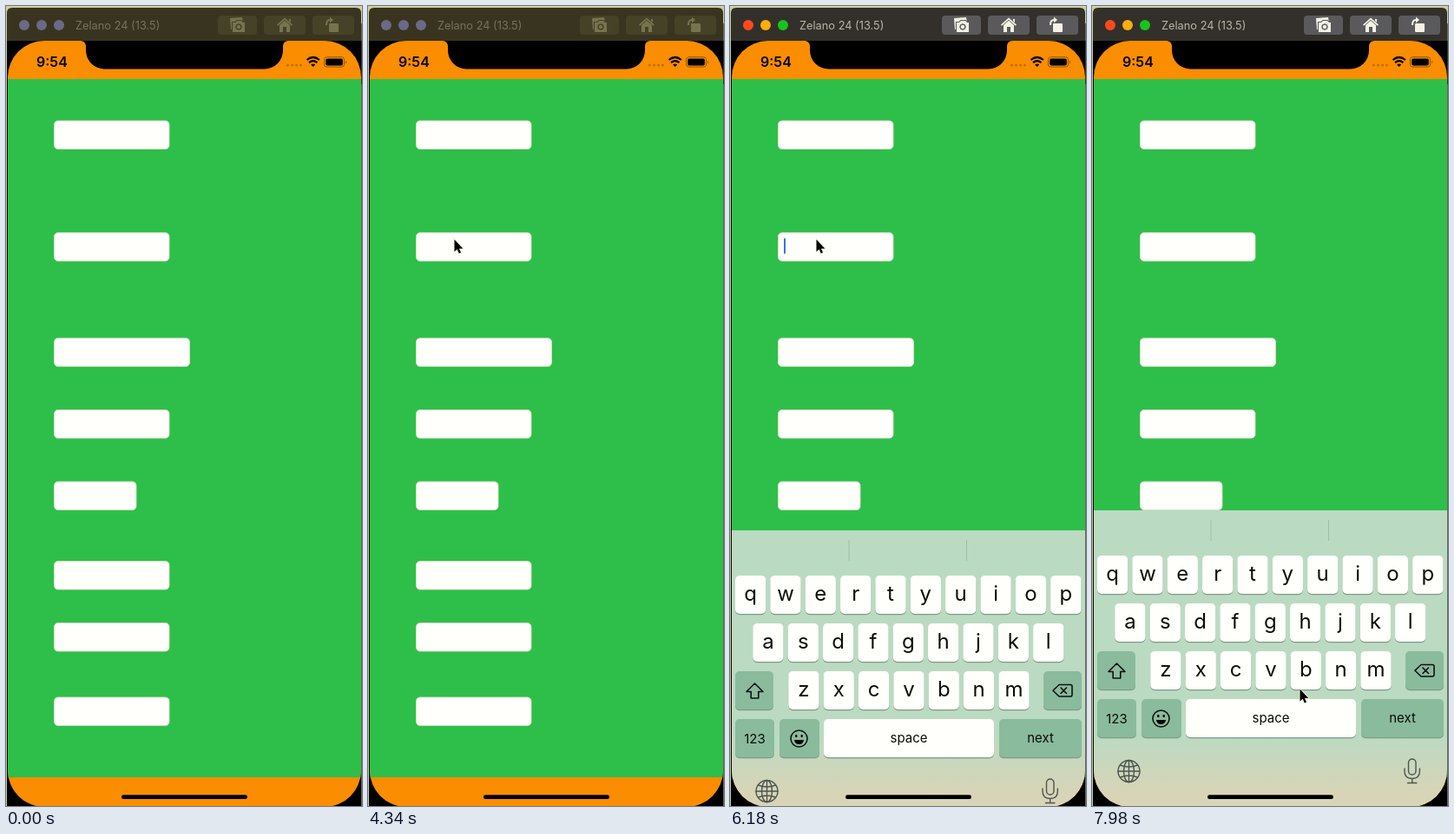
An HTML page for the animation above (8 s loop, 410x920 px).

```html
<!DOCTYPE html>
<html lang="en">
<head>
<meta charset="utf-8">
<title>Keyboard demo</title>
<style>
html, body { margin: 0; width: 100%; height: 100%; overflow: hidden; background: #cdd19c; }
svg { display: block; width: 410px; height: 920px; font-family: Inter, Roboto, sans-serif; }
.bar { fill: #38341f; } .btn { fill: #464227; } .icon { fill: #77734f; } .hole { fill: #464227; stroke: #464227; }
.title { fill: #77735a; font-size: 12.8px; } .light { fill: #6c6986; }
.active .bar { fill: #33302b; } .active .btn { fill: #5a5a5d; } .active .icon { fill: #f4f2e4; }
.active .hole { fill: #5a5a5d; stroke: #5a5a5d; }
.active .title { fill: #b9b5a8; }
.active .l0 { fill: #ff4a1c; } .active .l1 { fill: #fcae0c; } .active .l2 { fill: #18c41c; }
.letter { font-size: 24px; } .word { font-size: 15px; }
.letter, .word { text-anchor: middle; fill: #0c0c08; }
.line { fill: none; stroke: #111; stroke-width: 1.6; stroke-linejoin: round; stroke-linecap: round; }
.soft { stroke: #4c5550; stroke-width: 1.4; }
</style>
</head>
<body>
<svg id="stage" viewBox="0 0 410 920"></svg>
<script>
const LOOP = 8000, KEYS_TOP = 580;
const stage = document.getElementById('stage');

const rect = (x, y, w, h, r, attrs) =>
  `<rect x="${x}" y="${y}" width="${w}" height="${h}" rx="${r}" ${attrs}/>`;
const text = (x, y, s, cls) => `<text x="${x}" y="${y}" class="${cls}">${s}</text>`;
const key = (x, y, w, fill = '#fffffb') =>
  rect(x, y + 1.2, w, 44, 5, 'fill="#7f9a88"') + rect(x, y, w, 44, 5, `fill="${fill}"`);
const darkKey = (x, y, w) => key(x, y, w, '#8abb9c');
const letters = (s, x, y) => [...s].map((c, i) => {
  const left = x + 40.35 * i;
  return key(left, y, 35.2) + text(left + 17.6, y + 29, c, 'letter');
}).join('');

const titleBar = `<g id="window">
  <path class="bar" d="M1 42V8q0-6 6-6H403q6 0 6 6V42z"/>
  ${[0, 1, 2].map(i => `<circle class="light l${i}" cx="${21 + 20 * i}" cy="22" r="6"/>`).join('')}
  ${text(80, 27, 'Zelano 24 (13.5)', 'title')}
  ${[[244, 45], [297, 48], [353, 48]].map(([x, w]) => rect(x, 11, w, 22, 4, 'class="btn"')).join('')}
  <g class="icon">
    <path d="M258 14l14-1 1 6h-12v8h-2z"/>
    <path class="hole" stroke-width="2" d="M261 19h3l2-2h5l2 2h2v11h-14z"/>
    <path d="M261 19h3l2-2h5l2 2h2v11h-14z"/>
    <circle class="hole" cx="268" cy="24" r="3.2"/><circle cx="268" cy="24" r="2.2"/>
    <path d="M321 13.5l9 8-1.2 1.2-7.8-6.9-7.8 6.900-1.200-1.200zM315 22l6-5.200 6 5.200v8h-4v-6h-4v6h-4z"/>
    <path d="M326 15h2v4l-2-2z"/>
    ${rect(372, 20, 11, 10, 1, '')}
    <path d="M368 22q0-7 5-7v-2.500l4 3.500-4 3.500v-2.500q-3 0-3 5z"/>
  </g></g>`;

const fields = [[132, 133], [260.7, 133], [382, 156.5], [464.5, 133], [547, 95], [638.5, 133], [709.5, 133], [795, 133]]
  .map(([y, w]) => rect(55.5, y, w - .5, 32.5, 4.5, 'fill="#fffffb" stroke="#dfe4cb" stroke-width=".8"')).join('');

const statusBar = `
  <path d="M86 39v1a6 6 0 0 1 6 6v5a21.500 21.500 0 0 0 21.500 21.500H297.500a21.500 21.500 0 0 0 21.500-21.500v-5a6 6 0 0 1 6-6v-1z"/>
  <text x="35" y="70" font-size="16" font-weight="600">9:54</text>
  ${[324.5, 329.5, 334.5, 339.5].map(x => `<circle cx="${x}" cy="68" r="1.5" fill="#bd700a"/>`).join('')}
  <path d="M346.500 62q7.200-6 14.400 0M349 65.200q4.700-4 9.400 0" fill="none" stroke="#000" stroke-width="2.200"/>
  <path d="M351.200 67.400q2.500-2 5 0l-2.500 2.700z"/>
  ${rect(366.5, 58.7, 23, 11.4, 3, 'fill="none" stroke="#8a560c"')}
  ${rect(368.2, 60.4, 19.6, 8, 1.6, '')}
  <path d="M391 62.500q2 2 0 4z" fill="#8a560c"/>`;

// Keyboard contents, laid out from its own top edge
const keyboard = `
  <path d="M137 11v24M272.500 11v24" stroke="#7f9b88" stroke-opacity=".45"/>
  ${letters('qwertyuiop', 6, 52)}
  ${letters('asdfghjkl', 26.3, 107)}
  ${letters('zxcvbnm', 67.3, 162)}
  ${darkKey(6, 162, 44)}${darkKey(361, 162, 44)}
  <path class="line" d="M28.500 176l9.500 9.500h-5.200v7.500h-8.600v-7.500h-5.200z"/>
  <path class="line" d="M379 177.500h13q2 0 2 2v9.500q0 2-2 2h-13l-7-6.800zM381 181l6.500 6.500M387.500 181l-6.500 6.500"/>
  ${darkKey(6, 217, 45)}${text(28.5, 244.5, '123', 'word')}
  ${darkKey(57, 217, 46)}
  <circle class="line" cx="79.500" cy="239.500" r="9.500" stroke-width="1.300"/>
  <path d="M74 241h11q-.6 5-5.500 5t-5.500-5z"/>
  <ellipse cx="76.300" cy="236.500" rx="1.200" ry="1.800"/><ellipse cx="82.700" cy="236.500" rx="1.200" ry="1.800"/>
  ${key(108, 217, 196)}${text(206, 244, 'space', 'word')}
  ${darkKey(310, 217, 95)}${text(357.5, 244, 'next', 'word')}
  <g class="line soft">
    <circle cx="42.500" cy="300" r="12.500"/><ellipse cx="42.500" cy="300" rx="6" ry="12.500"/>
    <path d="M42.500 287.500v25M30 300h25M32.500 293q10 4 20 0M32.500 307q10-4 20 0"/>
    ${rect(364.5, 286, 8.5, 18, 4.25, '')}
    <path d="M360 297v3q0 8.500 8.700 8.500t8.700-8.500v-3M368.700 308.500v5M363.500 313.500h10.400"/>
  </g>`;

stage.innerHTML = `
  <defs>
    <clipPath id="screen">${rect(2, 40, 407, 881, 42, '')}</clipPath>
    <linearGradient id="glass" gradientUnits="userSpaceOnUse" x1="0" y1="840" x2="0" y2="905">
      <stop stop-color="#bbdac2"/><stop offset="1" stop-color="#d8d4b7"/>
    </linearGradient>
  </defs>
  ${rect(1, 20, 408.5, 900, 0, 'fill="#000"')}
  ${titleBar}
  <path d="M1 40H409.500V90H1z"/>
  <g clip-path="url(#screen)">
    ${rect(2, 40, 407, 881, 0, 'fill="#fb8d00"')}
    ${rect(2, 84, 407, 803, 0, 'fill="#2ebf4a"')}
    ${fields}
    ${rect(62, 267, 2, 18, 1, 'id="caret" fill="#426fd8"')}
    ${statusBar}
    ${rect(2, 920, 407, 345, 0, 'id="panel" fill="url(#glass)"')}
    <g id="keys">${keyboard}</g>
    ${rect(133, 907.3, 145, 4.8, 2.4, '')}
  </g>
  <path id="pointer" d="M.5 .5V14.500l3.200-2.800 2.100 4.700 2.200-.9-2.100-4.600h4.400z" stroke="#f7f7d8" stroke-width="1.600" paint-order="stroke"/>`;

const [win, caret, panel, keys, pointer] =
  ['window', 'caret', 'panel', 'keys', 'pointer'].map(id => document.getElementById(id));

// Pointer stops: time, x, y
const stops = [
  [2600, 150, 930], [3200, 119, 429], [3950, 99, 268],
  [6650, 99, 268], [6980, 131, 276], [7900, 239, 785]
];

function pointerAt(t) {
  const i = stops.findIndex(s => s[0] > t);
  if (i < 1) return stops.at(i).slice(1);
  const [a, b] = [stops[i - 1], stops[i]];
  const u = (t - a[0]) / (b[0] - a[0]), e = u * u * (3 - 2 * u);
  return [a[1] + (b[1] - a[1]) * e, a[2] + (b[2] - a[2]) * e];
}

// Critically damped rise from the bottom edge
function keyboardTop(t) {
  const s = Math.max(0, t - 5600) * .00753;
  return KEYS_TOP + (920 - KEYS_TOP) * (1 + s) * Math.exp(-s);
}

function draw() {
  const t = performance.now() % LOOP;
  const top = keyboardTop(t), [x, y] = pointerAt(t);
  win.setAttribute('class', t >= 4900 ? 'active' : '');
  caret.setAttribute('visibility', t >= 5620 && t < 7500 ? 'visible' : 'hidden');
  panel.setAttribute('y', top);
  keys.setAttribute('transform', `translate(0 ${top})`);
  pointer.setAttribute('transform', `translate(${x} ${y})`);
  requestAnimationFrame(draw);
}
draw();
</script>
</body>
</html>
```
